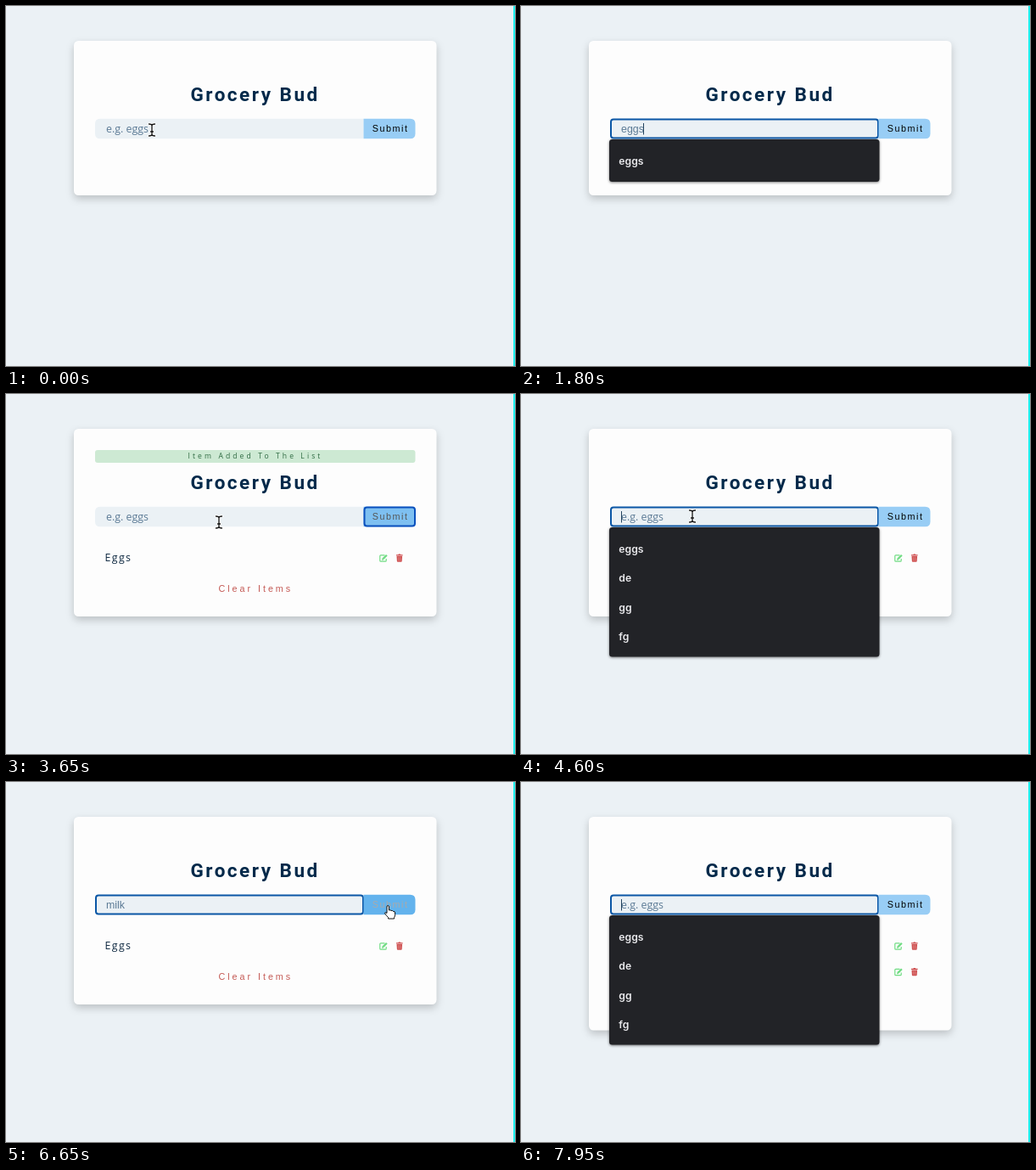
Recreate the animation shown at these times as an HTML page. Size 600 by 424 pixels, loop 8 s.

```html
<!DOCTYPE html>
<html lang="en">
<head>
<meta charset="utf-8">
<title>Grocery Bud</title>
<style>
  html, body { margin: 0; width: 100%; height: 100%; overflow: hidden; background: #ebf1f5; }
  svg { display: block; width: 600px; height: 424px; }
  text { white-space: pre; }
  .sans { font-family: "Open Sans", sans-serif; }
  .arial { font-family: "Liberation Sans", Arial, sans-serif; }
  .title { font: 700 22.5px Roboto, sans-serif; letter-spacing: 2.5px; fill: #02294a; }
  .field { font-size: 12.4px; fill: #5b7a95; }
  .button { font-size: 10.8px; letter-spacing: 1.5px; }
  .item { font-size: 12.4px; letter-spacing: 1.35px; fill: #102a42; }
  .clear { font-size: 10.8px; letter-spacing: 2.95px; fill: #c45a55; }
  .notice { font-size: 8.6px; letter-spacing: 3.08px; fill: #2f6a42; }
  .option { font: 600 12.2px Inter, sans-serif; fill: #e9e9ec; }
  .ring { fill: none; stroke-width: 2; }
  #card { filter: drop-shadow(0 4px 5px rgba(0, 0, 0, .2)); }
  #menuBox { filter: drop-shadow(0 1px 1.5px rgba(0, 0, 0, .5)); }
</style>
</head>
<body>
<svg viewBox="0 0 600 424">
  <defs>
    <g id="tools">
      <g fill="none" stroke="#70dc83">
        <path d="M446.5 189.8H441.8Q440.8 189.8 440.8 190.8V196.2Q440.8 197.2 441.8 197.2H447.2Q448.2 197.2 448.2 196.2V194" stroke-width="1.2"/>
        <path d="M444.2 194.4L448.9 189.7" stroke-width="2.3"/>
      </g>
      <path d="M443 195.8L443.4 193.6L445.2 195.4Z" fill="#70dc83"/>
      <path d="M460 189.2H462.3L462.8 188.6H464.8L465.3 189.2H467.6V190.4H460ZM460.5 191H467.1L466.7 197Q466.6 197.8 465.8 197.8H461.8Q461 197.8 460.9 197Z" fill="#cf4f50"/>
      <path d="M462.4 192V196.7M463.8 192V196.7M465.2 192V196.7" stroke="#e39a99" stroke-width=".5"/>
    </g>
  </defs>

  <rect width="600" height="424" fill="#ebf1f5"/>
  <rect x="598" width="2" height="424" fill="#1ff2f0"/>
  <rect id="card" x="80" y="41" width="427.5" height="182" rx="5.5" fill="#fdfdfd"/>

  <g id="notice">
    <rect x="105" y="66" width="377.5" height="15" rx="3" fill="#cde9d3"/>
    <text class="sans notice" x="214.5" y="76.3">Item Added To The List</text>
  </g>
  <text class="title" x="217.5" y="112">Grocery Bud</text>

  <path d="M421.5 132.7H111Q105 132.7 105 138.7V150.3Q105 156.3 111 156.3H421.5Z" fill="#ebf1f5"/>
  <text id="hint" class="sans field" x="118" y="149">e.g. eggs</text>
  <text id="typed" class="arial field" x="118" y="149"></text>
  <rect id="caret" y="138" width="1" height="13.5" fill="#23435e"/>
  <rect id="inputRing" class="ring" x="106" y="133.5" width="315" height="22" rx="3" stroke="#0b57a6"/>

  <path id="button" d="M421.5 132.7H476.5Q482.5 132.7 482.5 138.7V150.3Q482.5 156.3 476.5 156.3H421.5Z"/>
  <text id="label" class="arial button" x="431.8" y="148">Submit</text>
  <rect id="buttonRing" class="ring" x="422.5" y="133.5" width="59.5" height="22" rx="3" stroke="#0a50bd"/>

  <g id="eggs"><text class="sans item" x="116.5" y="196.5">Eggs</text><use href="#tools"/></g>
  <g id="milk" transform="translate(0 30.5)"><text class="sans item" x="116.5" y="196.5">Milk</text><use href="#tools"/></g>
  <text id="clear" class="arial clear" x="250.5">Clear Items</text>

  <g id="menu">
    <rect id="menuBox" x="104" y="157" width="318.5" rx="3.5" fill="#222327"/>
    <text class="option" x="115.3" y="187">eggs</text>
    <g id="more">
      <text class="option" x="115.3" y="221.3">de</text>
      <text class="option" x="115.3" y="255.6">gg</text>
      <text class="option" x="115.3" y="289.9">fg</text>
    </g>
  </g>

  <g id="pointer">
    <g id="beam" fill="none" stroke-linecap="round">
      <path d="M-3.5 -7Q-.5 -7 0 -5.5Q.5 -7 3.5 -7M0 -5.5V5.5M-3.5 7Q-.5 7 0 5.5Q.5 7 3.5 7M-1.5 2H1.5" stroke="#fff" stroke-width="2.8"/>
      <path d="M-3.5 -7Q-.5 -7 0 -5.5Q.5 -7 3.5 -7M0 -5.5V5.5M-3.5 7Q-.5 7 0 5.5Q.5 7 3.5 7M-1.5 2H1.5" stroke="#111" stroke-width="1.3"/>
    </g>
    <path id="hand" d="M-1 1Q-1 -.5 .2 -.5Q1.4 -.5 1.4 1V5Q3.6 4.4 4 5.6Q6 5 6.4 6.4Q8.6 6 8.6 8V10.5Q8.6 12 7.6 13.5V15H.6V13.6Q-1.4 11.6 -3.6 8.6Q-3.8 6.8 -1 8.4Z" fill="#fff" stroke="#111"/>
  </g>
</svg>
<script>
const LOOP = 8000, STEP = 50;
const el = id => document.getElementById(id);
const within = (t, spans) => spans.some(([from, to]) => t >= from && t < to);
const show = (id, on) => el(id).setAttribute("display", on ? "inline" : "none");
const set = (id, name, value) => el(id).setAttribute(name, value);
const clamp = v => Math.max(0, Math.min(1, v));

const added = { eggs: 2950, milk: 6750 };
const inputFocus = [[350, 2950], [4400, 6750], [7850, LOOP]];
const buttonFocus = [[2950, 4400], [6750, 7850]];
const notices = [[2950, 3950], [6750, 7750]];
const menus = [[350, 2450], [4400, 4950], [7850, LOOP]];
const hovers = [[2350, 3450], [6450, 6950]];
const hidden = [[1000, 1900], [4950, 6150], [7850, LOOP]];

// [time, text, caret x]
const typing = [
  [350, "", 118], [1000, "e", 125], [1200, "eg", 132], [1350, "egg", 138.5], [1550, "eggs", 144],
  [2950, "", 118], [4400, "", 118], [4950, "m", 128.5], [5250, "mi", 131], [5450, "mil", 134],
  [5700, "milk", 139.5], [6750, "", 118], [7850, "", 118]
];

// [time, x, y]
const route = [
  [0, 172, 146], [250, 170, 145], [1900, 170, 145], [2350, 423, 146], [2550, 450, 146],
  [3300, 450, 146], [3450, 421, 147], [3650, 251, 151], [3900, 207, 147], [4350, 202, 144],
  [6150, 202, 144], [6450, 423, 145], [6600, 450, 146], [6850, 450, 146], [6950, 421, 145],
  [7200, 261, 144], [7500, 190, 144], [7850, 165, 145], [LOOP, 165, 145]
];

function pointerAt(t) {
  const i = Math.max(1, route.findIndex(p => p[0] > t));
  const [a, b] = [route[i - 1], route[i]];
  const k = (t - a[0]) / (b[0] - a[0]);
  return [a[1] + (b[1] - a[1]) * k, a[2] + (b[2] - a[2]) * k];
}

const hoverAmount = t => Math.max(...hovers.map(([a, b]) =>
  Math.min(clamp((t - a) / 300), clamp(1 - (t - b) / 300))));

const mix = (a, b, k) => `rgb(${a.map((v, i) => Math.round(v + (b[i] - v) * k))})`;

function draw(t) {
  const rows = (t >= added.eggs) + (t >= added.milk);
  set("card", "height", [182, 221, 251.5][rows]);
  show("eggs", rows > 0);
  show("milk", rows > 1);
  show("clear", rows > 0);
  set("clear", "y", 202.3 + rows * 30.5);
  show("notice", within(t, notices));

  const focused = within(t, inputFocus);
  const [since, value, caretX] = typing.findLast(k => k[0] <= t) || [0, "", 118];
  el("typed").textContent = value;
  show("hint", !value);
  show("inputRing", focused);
  set("caret", "x", caretX);
  show("caret", focused && (t - since) % 1000 < 500);

  const hover = hoverAmount(t);
  set("button", "fill", mix([152, 205, 245], [73, 166, 233], hover));
  set("label", "fill", mix([0, 0, 0], [255, 255, 255], hover));
  show("buttonRing", within(t, buttonFocus));

  show("menu", within(t, menus));
  show("more", within(t, menus) && !value);
  set("menuBox", "height", value ? 50 : 152.5);

  const [x, y] = pointerAt(t);
  const onButton = within(t, hovers);
  set("pointer", "transform", `translate(${x} ${y})`);
  show("pointer", !within(t, hidden));
  show("beam", !onButton);
  show("hand", onButton);
}

const start = performance.now();
function tick() {
  const t = (performance.now() - start) % LOOP;
  draw(Math.floor(t / STEP) * STEP);
  requestAnimationFrame(tick);
}
tick();
</script>
</body>
</html>
```
